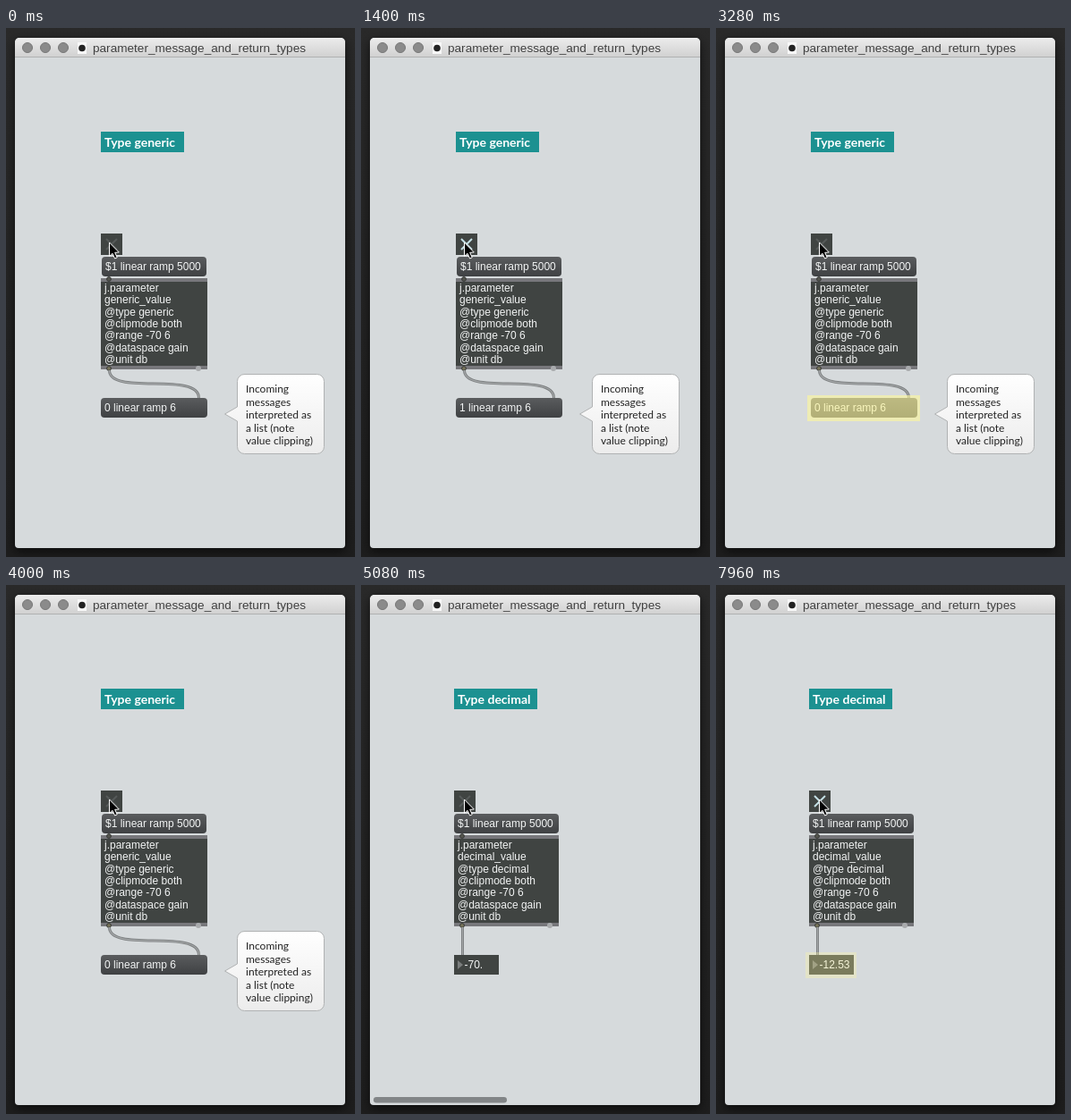
Animation of 390 by 592 pixels, one loop 8000 ms. Source, as an HTML page with a canvas:

```html
<!DOCTYPE html>
<html lang="en">
<head>
<meta charset="utf-8">
<title>Parameter types</title>
<style>
html, body { margin: 0; width: 100%; height: 100%; overflow: hidden; background: #222; }
canvas { display: block; width: 390px; height: 592px; }
</style>
</head>
<body>
<canvas id="stage" width="390" height="592"></canvas>
<script>
const ctx = document.getElementById('stage').getContext('2d');
const LOOP = 8000, STEP = 40;
const SANS = '12px "Liberation Sans", Arial, sans-serif';
const DARK = '#404442', PAGE = 380;

const clamp = x => Math.max(0, Math.min(1, x));
const ramp = (t, a, b) => clamp((t - a) / (b - a));
const smooth = x => x * x * (3 - 2 * x);

function vertical(y0, y1, top, bottom) {
  const g = ctx.createLinearGradient(0, y0, 0, y1);
  g.addColorStop(0, top);
  g.addColorStop(1, bottom);
  return g;
}

function box(x, y, w, h, fill, r = 0) {
  ctx.beginPath();
  ctx.roundRect(x, y, w, h, r);
  ctx.fillStyle = fill;
  ctx.fill();
}

function dot(x, y, r, fill, stroke) {
  ctx.beginPath();
  ctx.arc(x, y, r, 0, Math.PI * 2);
  ctx.fillStyle = fill;
  ctx.fill();
  if (stroke) {
    ctx.strokeStyle = stroke;
    ctx.lineWidth = 1;
    ctx.stroke();
  }
}

function text(str, x, y, font = SANS, fill = '#f2f4f4') {
  ctx.font = font;
  ctx.fillStyle = fill;
  ctx.fillText(str, x, y);
}

function lines(list, x, y, gap, font, fill) {
  list.forEach((s, i) => text(s, x, y + i * gap, font, fill));
}

function poly(points, fill, stroke) {
  ctx.beginPath();
  points.forEach(([x, y]) => ctx.lineTo(x, y));
  ctx.closePath();
  ctx.fillStyle = fill;
  ctx.fill();
  if (stroke) {
    ctx.strokeStyle = stroke;
    ctx.lineWidth = 1;
    ctx.stroke();
  }
}

function message(x, y, w, str) {
  box(x, y, w, 22, vertical(y, y + 22, '#5a5c5e', '#3f4143'), 4);
  text(str, x + 4, y + 15);
}

function toggle(x, on) {
  box(x, 230, 24, 24, DARK);
  ctx.beginPath();
  ctx.moveTo(x + 6, 236);
  ctx.lineTo(x + 18, 248);
  ctx.moveTo(x + 18, 236);
  ctx.lineTo(x + 6, 248);
  ctx.strokeStyle = on ? '#c4dfe4' : '#565a59';
  ctx.lineWidth = 2;
  ctx.stroke();
}

function cord(path) {
  for (const [width, color] of [[3, '#7c7f80'], [1.2, '#a4a7a8']]) {
    ctx.beginPath();
    path();
    ctx.strokeStyle = color;
    ctx.lineWidth = width;
    ctx.stroke();
  }
}

// Parts shared by both patches.
function patch(x, w, type, on) {
  box(x, 116, 93, 23, '#1c9191');
  text('Type ' + type, x + 4, 133, 'bold 14px Lato, sans-serif', '#fff');
  toggle(x, on);
  message(x + (w > 117 ? 1 : 0), 256, 117, '$1 linear ramp 5000');
  box(x, 280, w, 102, '#77777b');
  box(x, 284, w, 94, DARK);
  dot(x + 9, 281, 2.4, '#55564f', '#353735');
  dot(x + 9, 381, 2.4, '#77745a', '#353735');
  dot(x + w - 10, 381, 3, '#a9abad');
  lines(['j.parameter', type + '_value', '@type ' + type, '@clipmode both',
    '@range -70 6', '@dataspace gain', '@unit db'], x + 4, 295, 13.33);
}

function callout() {
  ctx.beginPath();
  ctx.moveTo(266, 387.5);
  ctx.arcTo(355.5, 387.5, 355.5, 476.5, 8);
  ctx.arcTo(355.5, 476.5, 258.5, 476.5, 8);
  ctx.arcTo(258.5, 476.5, 258.5, 440, 8);
  ctx.lineTo(258.5, 440);
  ctx.lineTo(244.5, 432);
  ctx.lineTo(258.5, 424);
  ctx.arcTo(258.5, 387.5, 266, 387.5, 8);
  ctx.closePath();
  ctx.fillStyle = vertical(387, 477, '#ffffff', '#ececec');
  ctx.fill();
  ctx.strokeStyle = '#b0b2b3';
  ctx.lineWidth = 1;
  ctx.stroke();
  lines(['Incoming', 'messages', 'interpreted as', 'a list (note', 'value clipping)'],
    268, 408.4, 14.4, '12px Lato, sans-serif', '#222');
}

function glow(x, w, amount) {
  if (amount <= 0) return;
  ctx.globalAlpha = 0.6 * amount;
  box(x, 411, w, 29, '#fff89a');
  ctx.globalAlpha = 1;
}

// Highlight pulse: quick rise, hold until "fall", then fade to "end".
const pulse = (t, start, fall, end) =>
  smooth(ramp(t, start - STEP, start + 360)) * (1 - smooth(ramp(t, fall, end)));

function generic(t) {
  const on = t >= 240 && t < 2760;
  patch(106, 119, 'generic', on);
  cord(() => {
    ctx.moveTo(115.5, 383);
    ctx.bezierCurveTo(115.5, 412, 215.5, 384, 215.5, 414);
  });
  message(106, 414, 119, (on ? 1 : 0) + ' linear ramp 6');
  callout();
  glow(102, 126, Math.max(pulse(t, 240, 860, 1400), pulse(t, 2760, 3420, 4000)));
}

// The ramp is linear in amplitude and shown in decibels.
function level(t) {
  const amp = 0.0563 + 0.0001731 * (t - 6920);
  const db = amp > 0 ? Math.max(-70, 20 * Math.log10(amp)) : -70;
  const s = String(+db.toFixed(2));
  return s.includes('.') ? s : s + '.';
}

function decimal(t) {
  patch(104, 117, 'decimal', t >= 6560);
  cord(() => {
    ctx.moveTo(113.5, 383);
    ctx.lineTo(113.5, 414);
  });
  box(104, 414, 50, 22, DARK);
  poly([[108, 420], [114, 425], [108, 430]], '#7a7d7d');
  text(level(t), 115.5, 429);
  glow(100, 57, pulse(t, 6560, 7740, 8180));
}

function frame() {
  ctx.fillStyle = vertical(0, 592, '#292929', '#1d1d1d');
  ctx.fillRect(0, 0, 390, 592);
  ctx.save();
  ctx.shadowColor = 'rgba(0,0,0,.6)';
  ctx.shadowBlur = 12;
  ctx.shadowOffsetY = 4;
  box(10, 11, 369, 571, '#d6dadc', [5, 5, 4, 4]);
  ctx.restore();
  box(10, 11, 369, 22, vertical(11, 33, '#ececec', '#d0d0d0'), [5, 5, 0, 0]);
  box(10, 32, 369, 1, '#b0b1b2');
  for (const x of [24, 44, 64]) dot(x, 22, 5.5, '#8b8b8b', '#777');
  box(80, 16, 10, 13, '#f8f8f8');
  dot(85, 22.5, 3.8, '#222');
  text('parameter_message_and_return_types', 97, 27,
    '13.6px "Liberation Sans", Arial, sans-serif', '#404040');
}

function cursor() {
  poly([[115.5, 240], [115.5, 255.5], [119, 252.3], [121.6, 258], [124.2, 256.8],
    [121.7, 251.3], [126.3, 251]], '#000', '#fff');
}

function draw(t) {
  frame();
  const p = smooth(ramp(t, 4880, 5080));
  ctx.save();
  ctx.beginPath();
  ctx.rect(10, 33, 369, 549);
  ctx.clip();
  if (p < 1) {
    ctx.save();
    ctx.translate(PAGE * p, 0);
    generic(t);
    ctx.restore();
  }
  if (p > 0) {
    ctx.save();
    ctx.translate(PAGE * (p - 1), 0);
    decimal(t);
    ctx.restore();
    ctx.globalAlpha = 1 - ramp(t, 5760, 6160);
    box(14 + PAGE * 0.41 * (1 - p), 573, 149, 6.5, '#828587', 3.2);
    ctx.globalAlpha = 1;
  }
  ctx.restore();
  cursor();
}

function tick() {
  const t = performance.now() % LOOP;
  draw(Math.floor(t / STEP) * STEP);
  requestAnimationFrame(tick);
}
tick();
</script>
</body>
</html>
```
